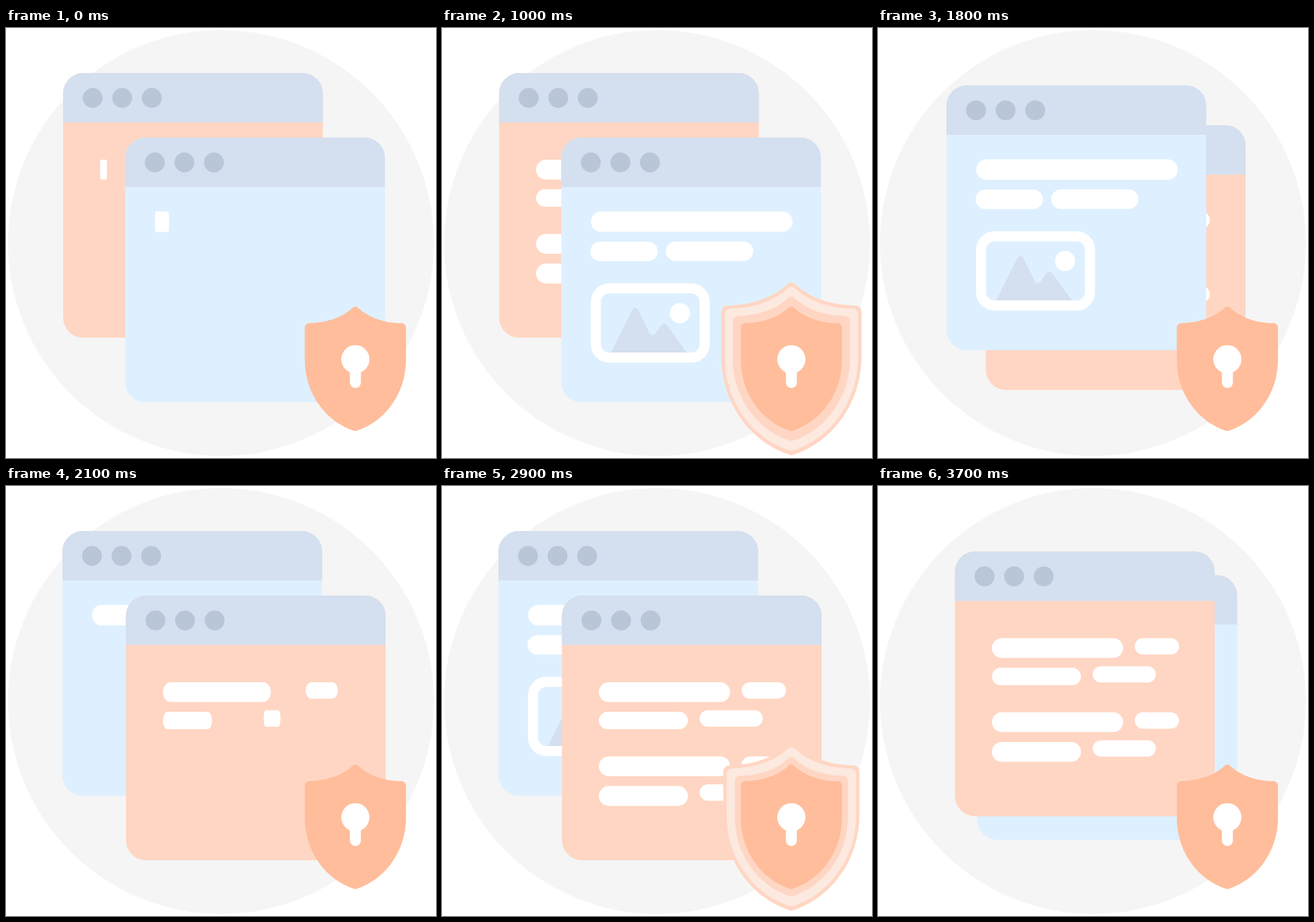
Write an HTML page that moves like this. It is 640x640 px and loops after 3.8 s.

```html
<!DOCTYPE html>
<html lang="en">
<head>
<meta charset="utf-8">
<title>Protected windows</title>
<style>
  html, body { margin: 0; width: 100%; height: 100%; overflow: hidden; background: #fff; }
  svg { display: block; width: 100%; height: 100%; }
</style>
</head>
<body>
<svg viewBox="0 0 640 640">
  <defs>
    <path id="shape" d="M515.5 416.7Q520 412.3 524.5 416.7C542 433 566 438.8 588 439.3Q595.3 439.5 595.3 447V494C595.3 542 566 585 522 599.6Q520 600.3 518 599.6C474 585 444.7 542 444.7 494V447Q444.7 439.5 452 439.3C474 438.8 498 433 515.5 416.7Z"/>
    <g id="header">
      <path fill="#d4dfef" d="M0 73.5V30A30 30 0 0 1 30 0H356.5A30 30 0 0 1 386.5 30V73.5Z"/>
      <g fill="#b9c6d7">
        <circle cx="44" cy="37" r="14.8"/><circle cx="88" cy="37" r="14.8"/><circle cx="132" cy="37" r="14.8"/>
      </g>
    </g>
  </defs>
  <circle cx="320" cy="320" r="317" fill="#f5f5f5"/>
  <g id="windows">
    <g id="peach">
      <rect width="386.5" height="394" rx="30" fill="#ffd6c3"/>
      <use href="#header"/>
    </g>
    <g id="blue">
      <rect width="386.5" height="394" rx="30" fill="#def0ff"/>
      <use href="#header"/>
      <g id="picture">
        <rect x="51.5" y="224.5" width="162" height="103" rx="20" fill="#def0ff"/>
        <path fill="#d4dfef" d="M73.5 320.5L105.5 257Q110 250.5 114.5 257L131.5 291.5Q135.5 297.5 140 292L149 279.5Q153 274.5 157.5 279.5L187 320.5Z"/>
        <rect x="51.5" y="224.5" width="162" height="103" rx="20" fill="none" stroke="#fff" stroke-width="15"/>
        <circle cx="176.5" cy="261.3" r="15" fill="#fff"/>
      </g>
    </g>
  </g>
  <g id="pulse">
    <use href="#shape" fill="#ffd6c3"/>
    <use href="#shape" fill="#fce9e0"/>
    <use href="#shape" fill="#ffd6c3"/>
  </g>
  <use href="#shape" fill="#ffbd9b"/>
  <g fill="#fff">
    <circle cx="520" cy="493" r="21"/>
    <rect x="511.8" y="500" width="16.4" height="36" rx="8.2"/>
  </g>
</svg>
<script>
  const LOOP = 3800, LEAD = 21, FLIP = 1848, SWAP = 250, GROW = 300;
  const el = id => document.getElementById(id);
  const windows = el('windows'), blue = el('blue'), peach = el('peach');
  const picture = el('picture'), pulse = el('pulse');
  const ramp = (t, start, length) => Math.min(1, Math.max(0, (t - start) / length));

  // A pill that stretches out from its left end: x, y, width, height, delay
  function pill(parent, [x, y, w, h, delay]) {
    const node = document.createElementNS('http://www.w3.org/2000/svg', 'rect');
    const attrs = { y, width: w, height: h, rx: h / 2, fill: '#fff' };
    for (const name in attrs) node.setAttribute(name, attrs[name]);
    parent.append(node);
    return { node, x, delay };
  }

  const blueRows = [[44.2, 110, 300, 30.4, 0], [43.3, 155, 100.3, 29, 256], [155.7, 154.6, 130, 29, 380]];
  const peachRows = [[55, 129, 195.3, 29.4, 5], [267.5, 129, 66, 24.4, 34], [55, 173, 132.5, 26, 86], [205, 170.7, 94, 24.4, 172],
    [55, 239.4, 195.3, 29.4, 335], [267.5, 239.4, 66, 24.4, 364], [55, 283.5, 132.5, 29.6, 416], [205, 281, 94, 24.4, 502]];
  const pills = [...blueRows.map(r => pill(blue, r)), ...peachRows.map(r => pill(peach, r))];
  const ringStarts = [593, 663, 832];

  function scaleAt(node, cx, cy, s) {
    node.setAttribute('transform', `translate(${cx} ${cy}) scale(${s}) translate(${-cx} ${-cy})`);
    node.setAttribute('visibility', s > 0 ? 'visible' : 'hidden');
  }

  function place(node, x, y, depth) {
    node.setAttribute('transform', `translate(${x + 93.5 * depth} ${y + 96 * depth})`);
  }

  function draw(now) {
    const t = (now + LEAD) % LOOP - LEAD;
    const blueFront = t < FLIP;
    const age = blueFront ? t + LEAD : t - FLIP;
    const end = blueFront ? FLIP : LOOP - LEAD;
    const moved = ramp(t, end - SWAP, SWAP);
    const depth = blueFront ? 1 - moved : moved;

    place(blue, 84, 67.1, depth);
    place(peach, 85, 67.1, 1 - depth);
    const front = blueFront ? blue : peach;
    if (windows.lastElementChild !== front) windows.append(front);

    for (const { node, x, delay } of pills) {
      const s = ramp(age, delay, GROW);
      node.setAttribute('transform', `translate(${x} 0) scale(${s} 1)`);
      node.setAttribute('visibility', s > 0 ? 'visible' : 'hidden');
    }
    scaleAt(picture, 132.5, 276, ramp(age, 450, GROW));

    const beat = blueFront ? t : t - 1943;
    ringStarts.forEach((start, i) => {
      const p = ramp(beat, start, 437);
      scaleAt(pulse.children[i], 520, 507.4, p > 0 ? 1 + 0.415 * p : 0);
    });
    pulse.setAttribute('opacity', 1 - ramp(beat, 1270, 325));
  }

  let origin;
  function tick(now) {
    origin ??= now;
    draw(now - origin);
    requestAnimationFrame(tick);
  }
  draw(0);
  requestAnimationFrame(tick);
</script>
</body>
</html>
```
